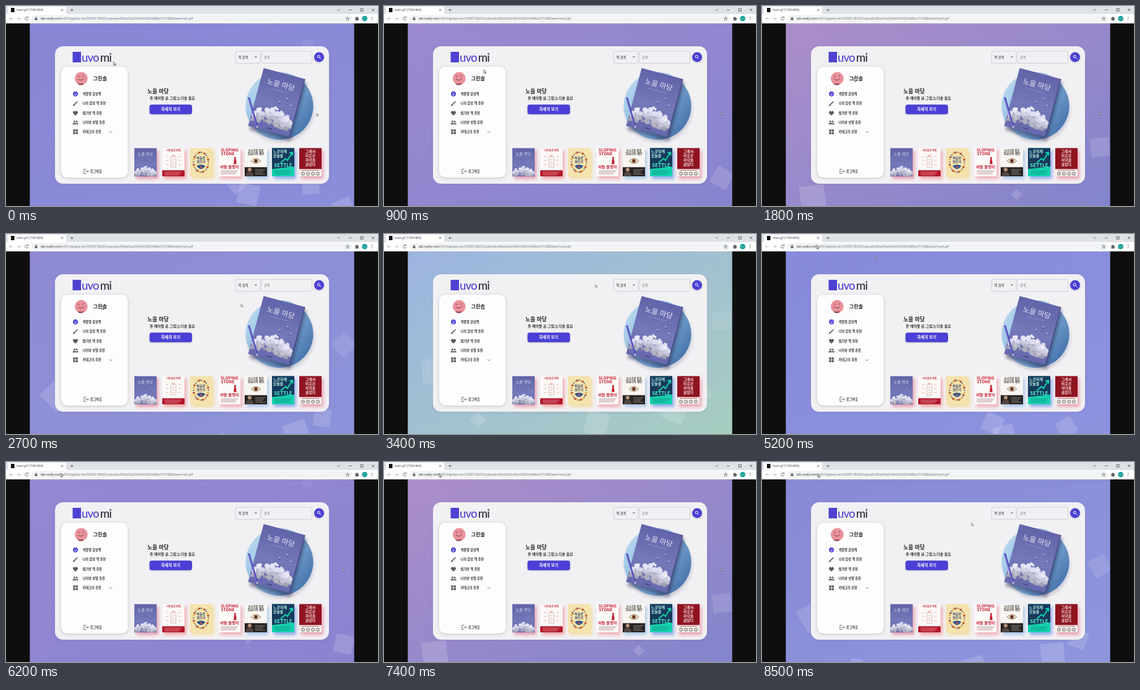
An HTML page that plays this animation: 600 px wide and 323 px high, repeating every 8600 ms.

```html
<!DOCTYPE html>
<html lang="ko">
<head>
<meta charset="utf-8">
<style>
html, body { margin: 0; width: 100%; height: 100%; overflow: hidden; background: #0e0e0e; }
svg { display: block; width: 100%; height: 100%; }
text { font-family: "Noto Sans CJK KR", "Noto Sans CJK", "Noto Sans", sans-serif; fill: #222; }
.ui { font-family: "Open Sans", sans-serif; }
.b { font-weight: 700; }
.line { fill: none; stroke: #5f6368; stroke-width: .9; }
</style>
</head>
<body>
<svg id="stage" viewBox="0 0 600 323">
<defs>
  <linearGradient id="sky" x1="0" y1="0" x2="1" y2="1"><stop id="c1"/><stop id="c2" offset="1"/></linearGradient>
  <linearGradient id="ball" x1="0" y1=".1" x2="1" y2=".8">
    <stop stop-color="#c4e0f3"/><stop offset=".5" stop-color="#86b4dd"/><stop offset="1" stop-color="#3f6ca6"/>
  </linearGradient>
  <linearGradient id="dusk" x1="0" y1="0" x2="0" y2="1">
    <stop stop-color="#6163a8"/><stop offset=".55" stop-color="#7479b9"/><stop offset="1" stop-color="#6668ad"/>
  </linearGradient>
  <filter id="soft" x="-40%" y="-40%" width="180%" height="180%"><feGaussianBlur stdDeviation="2.4"/></filter>
  <filter id="haze" x="-40%" y="-40%" width="180%" height="180%"><feGaussianBlur stdDeviation=".9"/></filter>
  <clipPath id="view"><rect x="38.4" y="28" width="523.2" height="295"/></clipPath>
  <clipPath id="thumb"><rect width="36" height="46"/></clipPath>
  <clipPath id="page"><rect width="69" height="97"/></clipPath>
  <g id="cover" clip-path="url(#page)">
    <rect width="69" height="97" fill="url(#dusk)"/>
    <g id="clouds"></g>
    <g fill="#e9e6f2"><circle cx="50" cy="38" r="1"/><circle cx="58" cy="47" r="1"/><circle cx="39" cy="46" r=".9"/></g>
    <path d="M50 39l1.500 2.500M58 48l-1.500 2.500M39 47l1.500 2.500" stroke="#3d3a70" stroke-width=".8"/>
    <text x="11" y="23" font-size="11.6" style="fill:#e9e7f4;font-family:'Noto Serif','Noto Sans CJK KR',serif">노을 마당</text>
    <path d="M20 29h30" stroke="#b9b8dc" stroke-width=".6" stroke-dasharray="2 1"/>
    <path d="M30 92h9" stroke="#2f2e55" stroke-width="1"/>
  </g>
  <path id="arrow" d="M0 0V5.6L1.4 4.4L2.3 6.4L3.2 6L2.3 4L4.1 3.9Z" fill="#fff" stroke="#222" stroke-width=".6"/>
  <path id="hand" d="M0 0.6q.8-1 1.4 0l.5 2 2.6.6q1 .4.6 1.6l-.5 2H2L-.6 4.2q0-.9 1.2-.3Z" fill="#fff" stroke="#222" stroke-width=".6"/>
</defs>

<g clip-path="url(#view)">
  <rect x="38" y="28" width="524" height="295" fill="url(#sky)"/>
  <g id="squares" fill="#fff"></g>
</g>

<rect x="79" y="66" width="442" height="222" rx="13" fill="#443a80" opacity=".1" filter="url(#soft)"/>
<rect x="79" y="65" width="442" height="222" rx="13" fill="#f1f0f3"/>

<rect x="107.5" y="74" width="13.5" height="17" fill="#4f42d2"/>
<text x="122" y="90" font-size="18.5" letter-spacing="-.8" font-weight="500" style="font-family:Lato,sans-serif;fill:#4f42d2">uvo <tspan style="fill:#2c2b38" dx="-2">mi</tspan></text>

<g fill="none" stroke="#c5c5ca" stroke-width=".7">
  <rect x="370.5" y="73" width="39.5" height="19.5" rx="1.8"/><rect x="412" y="73" width="81.5" height="19.5" rx="1.8"/>
</g>
<text x="374.5" y="84.6" font-size="5.2">책 검색</text>
<path id="caret" d="M401 81.5h4l-2 2.2Z" fill="#666"/>
<text x="416" y="84.6" font-size="5.2" style="fill:#777">검색</text>
<circle cx="505" cy="83.4" r="8" fill="#777" opacity=".4" filter="url(#haze)"/>
<circle cx="505" cy="82.5" r="7.9" fill="#4b3fd6"/>
<g fill="none" stroke="#fff" stroke-width="1"><circle cx="504.2" cy="81.6" r="2"/><path d="M505.8 83.2l2.4 2.4"/></g>

<rect x="89" y="99" width="107.5" height="179" rx="10" fill="#555" opacity=".28" filter="url(#soft)"/>
<rect x="89" y="98" width="107.5" height="179" rx="10" fill="#fdfdfe"/>
<circle cx="121.3" cy="117" r="10.4" fill="#ea929c"/>
<path d="M115.5 124.5q5 2.500 10 0l-1.500 2.500q-3.500 1-7 0Z" fill="#7c3140"/>
<g fill="none" stroke="#6b2f38" stroke-width=".8" stroke-linecap="round"><path d="M116 113l2.300 1M123.500 113.500l2.300-1M116 118q5.500 4 10-1"/></g>
<text x="140.5" y="120.3" font-size="8.1" class="b">그린솔</text>
<g id="menu"></g>
<g fill="#5c5c62">
  <circle cx="112" cy="142" r="4" fill="#4b3fd6"/>
  <path d="M110 143q2 2.8 4 0Z" fill="#fff"/><circle cx="110.6" cy="140.9" r=".7" fill="#fff"/><circle cx="113.4" cy="140.9" r=".7" fill="#fff"/>
  <path d="M115.4 153.6l.8.8-4.4 4.6-1.4-1.3ZM110 158q1.6.6 1.4 2-.8 1.8-3.8 1.4 1-.6 1-1.8.2-1.3 1.4-1.6Z"/>
  <path d="M112 177l-3.3-3.3q-1.6-2.3.2-3.8 1.8-1 3.1.7 1.3-1.7 3.1-.7 1.8 1.5.2 3.8Z"/>
  <circle cx="110.3" cy="186.5" r="1.5"/><circle cx="114" cy="186.5" r="1.5"/>
  <path d="M107.3 191.2q0-2.4 3-2.4t3 2.4ZM113.8 191.2q0-1.6-.8-2.3 3.8-.6 3.8 2.3Z"/>
  <path d="M108.2 199.3h3.4v3.4h-3.4ZM108.2 203.6h3.4v3.4h-3.4ZM112.5 203.6h3.4v3.4h-3.4ZM112.5 199.3h3.4v3.4h-3.4Z"/>
</g>
<path class="line" d="M167 202.5l2.2 2.2 2.2-2.2"/>
<path class="line" d="M129.5 263.6h-3.7v7h3.7M128 267.1h5M131.3 265.3l1.8 1.8-1.8 1.8"/>

<text x="228" y="141" font-size="8.7" class="b">노을 마당</text>
<text x="232" y="150.6" font-size="5.8" class="b" style="fill:#333">톤 메이렐 글.그림;노다솔 옮김</text>
<rect x="231.5" y="160.5" width="68.5" height="15" rx="3.5" fill="#555" opacity=".35" filter="url(#haze)"/>
<rect x="231.5" y="159.3" width="68.5" height="15.4" rx="3.5" fill="#4b3fd6"/>
<text x="265.7" y="169.3" font-size="6.3" class="b" text-anchor="middle" style="fill:#fff">자세히 보기</text>

<circle cx="443" cy="166" r="54" fill="#6b6f8f" opacity=".28" filter="url(#soft)"/>
<circle cx="441" cy="161.5" r="54.5" fill="url(#ball)"/>
<g transform="translate(415.5 100) rotate(15)">
  <rect x="4" y="5" width="69" height="98" fill="#222448" opacity=".45" filter="url(#soft)"/>
  <use href="#cover"/>
  <path d="M69 0v97" stroke="#45457f" stroke-width="1.2"/>
</g>
<g transform="translate(389.5 146) rotate(-16)">
  <rect x="0" y="2" width="3" height="48" rx="1" fill="#4540ae"/>
  <path d="M.9 3v46" stroke="#8d8be6" stroke-width=".9"/>
  <path d="M0 50h3l-1.500 6Z" fill="#d8cbd6"/><path d="M.9 53.500h1.200l-.6 2.500Z" fill="#2b2960"/>
</g>

<g id="books"></g>

<rect width="600" height="13.5" fill="#dee1e6"/>
<path d="M1 13.5q2 0 2-2V3q0-2 2-2h90q2 0 2 2v8.5q0 2 2 2Z" fill="#fff"/>
<rect y="13" width="600" height="15" fill="#fff"/>
<rect x="41" y="14.6" width="517" height="11.4" rx="5.7" fill="#f1f3f4"/>
<path d="M0 27.8h600" stroke="#d5d7da" stroke-width=".5"/>
<rect x="8" y="3" width="5.6" height="7" fill="#111"/>
<text x="17" y="8.2" class="ui" font-size="4.7" style="fill:#3c4043">main.gif (1536×864)</text>
<text x="56" y="22.3" class="ui" font-size="5.27" style="fill:#6b6f74"><tspan style="fill:#25282c">lab.ssafy.com</tspan>/s05-bigdata-rec/S05P21B203/uploads/82eb5a2c6fe243d204d8ba1510882eea/main.gif</text>
<g class="line">
  <path d="M89 4.8l3.2 3.2M92.2 4.8l-3.2 3.2M104 6.5h4.6M106.3 4.2v4.6"/>
  <path d="M11 20.3H5.5M8 17.8l-2.5 2.5 2.5 2.5M17.5 20.3h5.5M20.500 17.8l2.500 2.500-2.500 2.500" stroke="#b5b8bc"/>
  <path d="M35.4 18.6a2.6 2.6 0 1 0 .3 2.6M35.8 17v2h-2"/>
  <path d="M47.3 19.6v-1q1.2-1.6 2.4 0v1"/>
  <path d="M551 17.5l.8 2 2.1.1-1.6 1.4.5 2.1-1.8-1.2-1.8 1.2.5-2.1-1.6-1.4 2.1-.1Z" stroke-width=".7"/>
  <path d="M534.500 5.300l2 2 2-2M553 6.300h4.500M572 4.300h4v4h-4ZM590 4.200l4 4M594 4.200l-4 4" stroke="#333" stroke-width=".7"/>
</g>
<g fill="#5f6368">
  <rect x="46.5" y="19.5" width="4" height="3.3" rx=".5"/>
  <path d="M563.5 18.3h1.5q.9-2 1.8 0h1.6v1.7q1.9.8 0 1.7v1.7h-4.9Z"/>
  <circle cx="590.5" cy="18" r=".7"/><circle cx="590.5" cy="20.3" r=".7"/><circle cx="590.5" cy="22.6" r=".7"/>
</g>
<circle cx="578.5" cy="20.3" r="4.3" fill="#0f9c94"/>
<text x="578.5" y="21.6" font-size="3.2" text-anchor="middle" style="fill:#d9f3f0">하나</text>

<use id="inner" href="#arrow"/>
<use id="outer" href="#arrow"/>
</svg>

<script>
const LOOP = 8600, RESTART = 4550, REWIND = 5600;
const $ = id => document.getElementById(id);
const text = (x, y, size, fill, s) =>
  `<text x="${x}" y="${y}" font-size="${size}" class="b" text-anchor="middle" style="fill:${fill}">${s}</text>`;
const rect = (x, y, w, h, fill) => `<rect x="${x}" y="${y}" width="${w}" height="${h}" fill="${fill}"/>`;
const dot = (x, y, r, fill) => `<circle cx="${x}" cy="${y}" r="${r}" fill="${fill}"/>`;
const range = (n, f) => Array.from({ length: n }, (_, i) => f(i)).join('');
const rows = (x, y, w, n, gap, color) => range(n, i =>
  `<path d="M${x} ${y + i * gap}h${w - (i % 3) * 2}" stroke="${color}" stroke-width=".6"/>`);

let seed = 7;
const rnd = () => (seed = seed * 16807 % 2147483647) / 2147483647;

// billows: grey underneath, white towards the crest
$('clouds').innerHTML = range(130, i => {
  const depth = 1 - i / 130, x = 2 + rnd() * 64;
  const crest = 54 + Math.abs(x - 36) * .5 + Math.sin(x * .5) * 3;
  const y = crest + (86 - crest) * Math.min(1, depth * .8 + rnd() * .3);
  const c = Math.round(246 - depth * 85 - rnd() * 22);
  return dot(x, y, 1.6 + rnd() * 3, `rgb(${c},${c},${Math.min(250, c + 18)})`);
});

$('menu').innerHTML = ['색깔별 감성책', '나의 감성 책 추천', '찜기반 책 추천', '나이와 성별 추천', '카테고리 추천']
  .map((s, i) => `<text x="123.6" y="${144 + i * 15.3}" font-size="5.15" class="b" style="fill:#333">${s}</text>`).join('') +
  '<text x="135.8" y="269" font-size="5.2" class="b" style="fill:#333">로그아웃</text>';

const covers = [
  [207, '#e58fa0', '<use href="#cover" transform="scale(.522)"/>'],
  [252, '#f09a9a', rect(0, 0, 36, 46, '#fbf8f6') + text(18, 6, 4, '#c22a3a', '나무결의 방법') +
    '<path d="M14 15q4-8 8 0v16h-8ZM6 14h4M6 20h4M6 27h4M26 14h4M26 20h4M26 27h4M16 19h4M16 23h4M16 27h4" fill="none" stroke="#cda39f" stroke-width=".7"/>' +
    dot(18, 13, 2.3, '#edc5b5') + rect(0, 36, 36, 10, '#b3162b') + rows(4, 39, 27, 3, 2.2, '#f0b9bd')],
  [296.5, '#f3d98e', rect(0, 0, 36, 46, '#f5e3ae') + range(24, i => {
    const a = i * Math.PI / 12;
    return dot(18 + 12 * Math.cos(a), 23 + 16 * Math.sin(a), 1 + i % 3 * .4, ['#2c4c86', '#d8a743', '#b9583f'][i % 3]);
  }) + text(18, 18, 5, '#25406f', '바늘로') + text(18, 24, 5, '#25406f', '실뜨기') +
    '<path d="M11 29q7 10 14 0-7-4-14 0" fill="#32548d"/>' + dot(18, 31, 1.5, '#d65a45')],
  [342.5, '#f0a3ab', rect(0, 0, 36, 46, '#fcfaf8') + text(18, 5.5, 6.6, '#c81f34', 'SLOPING') + text(15, 12, 6.6, '#c81f34', 'STONE') +
    dot(27, 16, 1.6, '#c81f34') + '<path d="M25.500 18h3l.8 8h-4.600Z" fill="#c81f34"/>' +
    text(18, 33, 6.2, '#c81f34', '비탈 돌멩이') + rows(4, 37, 28, 3, 2.4, '#8b5a5e')],
  [385, '#9fc3ea', rect(0, 0, 36, 46, '#f8f6f1') + text(18, 5.5, 4.3, '#3a3536', '소나기를 위한') + text(18, 11, 4.6, '#3a3536', '일곱가지 제안') +
    '<path d="M10 21q8-8 16 0-8 8-16 0Z" fill="#e5dfc9" stroke="#8b7f60" stroke-width=".8"/>' + dot(18, 21, 3.2, '#a5583f') + dot(18, 21, 1.5, '#252525') +
    rect(0, 31, 36, 15, '#272323') + dot(8, 35, 3, '#b98f78') + '<path d="M2 46q0-8 6-8t6 8Z" fill="#514641"/>' + rows(17, 35, 16, 4, 2.5, '#c7beb2')],
  [429, '#7f9be9', rect(0, 0, 36, 46, '#14d0ae') + '<path d="M0 0h36v30l-36 4Z" fill="#163a5c"/>' +
    text(13, 8, 6, '#c9fff1', '느긋하게') + text(10, 15, 6, '#c9fff1', '오늘을') + '<path d="M14 24l8-7 3 3L33 7M28 8l5-1 .5 5" fill="none" stroke="#17d7b0" stroke-width="1.8"/>' +
    text(18, 31, 8, '#4ff0cd', 'SETTLE') + rows(4, 37, 28, 3, 2.5, '#167766')],
  [473, '#ea93a5', rect(0, 0, 36, 46, '#8f1421') + ['그래서', '이웃은', '저녁을', '골랐다'].map((s, i) => text(18, 8 + i * 7, 5.9, '#f6e3e3', s)).join('') +
    rect(0, 34, 36, 12, '#f4efec') + rows(4, 36, 28, 1, 2, '#8f1421') +
    range(4, i => `<circle cx="${6 + i * 8}" cy="41.5" r="2.6" fill="#d9d2cc" stroke="#444" stroke-width=".6"/>`)],
];
$('books').innerHTML = covers.map(([x, glow, art]) =>
  `<g transform="translate(${x} 229.3)"><rect x="3" y="4" width="36" height="46" fill="${glow}" opacity=".8" filter="url(#soft)"/>` +
  `<g clip-path="url(#thumb)">${art}</g></g>`).join('');

// time, upper left colour, lower right colour
const tints = [
  [-1000, [130, 138, 217], [143, 151, 224]],
  [-400, [134, 138, 217], [141, 147, 223]],
  [0, [137, 133, 213], [139, 142, 218]],
  [600, [150, 135, 210], [137, 132, 208]],
  [1800, [172, 142, 202], [130, 132, 203]],
  [2900, [136, 137, 213], [141, 150, 221]],
  [3400, [157, 180, 225], [167, 205, 192]],
  [4200, [159, 178, 127], [178, 173, 131]],
];
const innerPath = [[-1000, [120, 34]], [-400, [182, 36]], [0, [501, 173]], [500, [543.5, 172]], [1900, [543.5, 172]],
  [2900, [338, 98.5]], [3400, [341, 81.5]], [4100, [397, 77]]];
const outerPath = [[0, [173.5, 90]], [1800, [148.5, 116]], [3400, [158, 116]], [4200, [91, 26.5]], [5200, [88, 18]], [6200, [88, 18]], [8500, [90, 19]]];

// squares: time, x, y at that time, size, angle
const drift = [[0, 391, 304, 33, 12], [300, 487, 47, 18, 5], [-400, 372, 306, 30, 25], [-400, 491, 312, 28, -30],
  [1800, 82, 310, 40, -8], [1800, 411, 304.5, 13, 45], [1800, 545, 228, 30, -6], [2900, 510, 286, 28, 20],
  [3400, 152, 300, 19, 40], [3400, 343, 306, 36, 14], [3400, 469, 284, 38, 24]];
$('squares').innerHTML = drift.map(([, , , s]) => `<rect x="${-s / 2}" y="${-s / 2}" width="${s}" height="${s}" rx="1"/>`).join('');
const squares = [...$('squares').children];

const mix = (a, b, k) => a.map((v, i) => v + (b[i] - v) * k);
function at(keys, t, col = 1) {
  const i = keys.findIndex(k => k[0] > t);
  if (i < 0) return keys[keys.length - 1][col];
  if (i === 0) return keys[0][col];
  const a = keys[i - 1], b = keys[i];
  return mix(a[col], b[col], (t - a[0]) / (b[0] - a[0]));
}
const move = (el, [x, y], size = 1) => el.setAttribute('transform', `translate(${x} ${y}) scale(${size})`);
const rgb = c => `rgb(${c.map(Math.round)})`;

function draw(time) {
  const t = Math.floor(time % LOOP / 100) * 100;
  const p = t < RESTART ? t : t - REWIND;
  $('c1').setAttribute('stop-color', rgb(at(tints, p)));
  $('c2').setAttribute('stop-color', rgb(at(tints, p, 2)));
  squares.forEach((el, i) => {
    const [t0, x, y0, , a] = drift[i], dt = p - t0, y = y0 - dt * .055;
    el.setAttribute('transform', `translate(${x} ${y}) rotate(${a + dt * .06})`);
    el.setAttribute('opacity', Math.max(0, Math.min(.16, .04 + y / 2700)));
  });
  const pointing = p > 4000;
  $('inner').setAttribute('href', pointing ? '#hand' : '#arrow');
  $('caret').setAttribute('opacity', pointing ? 0 : 1);
  move($('inner'), at(innerPath, p), pointing ? 1 : .75);
  move($('outer'), at(outerPath, t));
}

const start = performance.now();
function tick() {
  draw(performance.now() - start);
  requestAnimationFrame(tick);
}
draw(0);
requestAnimationFrame(tick);
</script>
</body>
</html>
```
